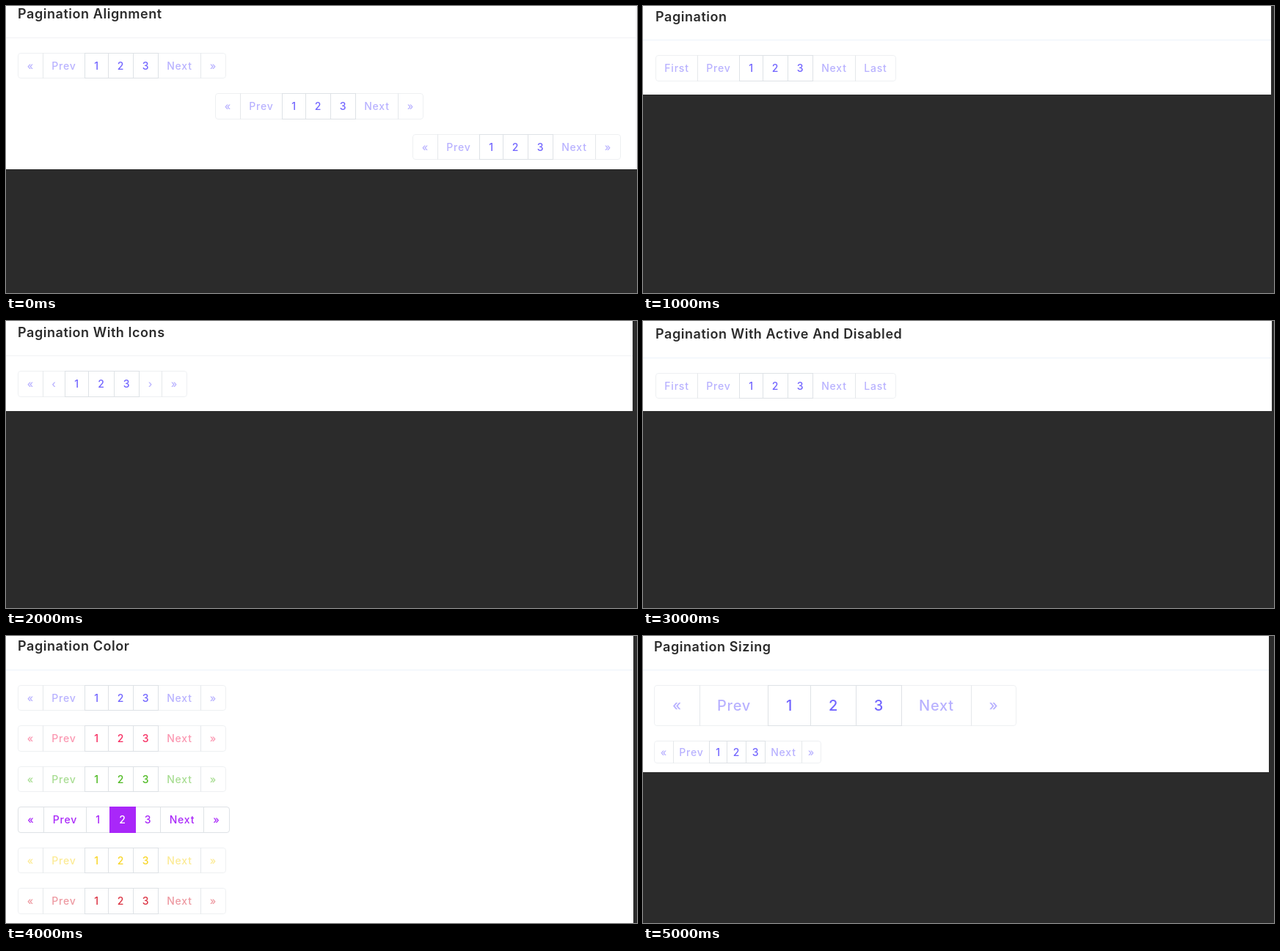
Animation of 860x392 px, one loop 6000 ms. Source, as an HTML page:

```html
<!DOCTYPE html>
<html lang="en">
<head>
<meta charset="utf-8">
<title>Pagination styles</title>
<style>
  html, body { margin: 0; width: 100%; height: 100%; overflow: hidden; background: #2b2b2b; }
  body { font: 450 14px Inter, Roboto, sans-serif; letter-spacing: .8px; }
  .card, .card > *, .cell { position: absolute; box-sizing: border-box; }
  .card { left: 0; top: 0; background: #fff; overflow: hidden; visibility: hidden; animation: show 6s step-end infinite; }
  @keyframes show {
    0% { visibility: visible; }
    16.66667%, 100% { visibility: hidden; }
  }
  .title { font-size: 18px; font-weight: 600; line-height: 20px; letter-spacing: .55px; color: #2b2b2b; white-space: nowrap; }
  .rule { left: 0; width: 100%; height: 1px; }
  .cell { top: 0; height: 100%; border: 1px solid #dee2e6; text-align: center; white-space: nowrap; }
  .cell:first-child { border-radius: 4px 0 0 4px; }
  .cell:last-child { border-radius: 0 4px 4px 0; }
  .off { opacity: .5; }
  .on { z-index: 1; color: #fff; }
</style>
</head>
<body>
<script>
const PRIMARY = '#7366ff';
const ARROWS = ['«', 'Prev', 1, 2, 3, 'Next', '»'];
const WORDS = ['First', 'Prev', 1, 2, 3, 'Next', 'Last'];
const ICONS = ['«', '‹', 1, 2, 3, '›', '»'];

// Left borders of the cells, followed by the last right border.
const EDGES = {
  arrows: [0, 34, 91, 123, 157, 191, 249, 283],
  active: [0, 35, 93, 125, 160, 194, 253, 288],
  words: [0, 57, 114, 146, 180, 214, 272, 327],
  icons: [0, 34, 64, 96, 131, 165, 196, 230],
  large: [0, 62, 155, 213, 275, 337, 432, 493],
  small: [0, 26, 75, 99, 125, 151, 201, 227]
};

const pager = (x, y, height, options = {}) =>
  ({ x, y, height, edges: EDGES.arrows, labels: ARROWS, color: PRIMARY, size: 14, ...options });

const colors = [PRIMARY, '#f73164', '#51bb25', '#a927f9', '#f8d62b', '#dc3545'];
const words = { edges: EDGES.words, labels: WORDS };

const cards = [
  { title: 'Pagination Alignment', x: 16, titleY: 11, ruleY: 43, width: 858, height: 223, rule: '#f1f2f4', edge: '#f4f4f6',
    pagers: [pager(16, 64, 35), pager(285, 119, 36), pager(554, 175, 35)] },
  { title: 'Pagination', x: 17, titleY: 15, ruleY: 46, width: 856, height: 121,
    pagers: [pager(17, 67, 36, words)] },
  { title: 'Pagination With Icons', x: 16, titleY: 16, ruleY: 47, width: 854, height: 123, rule: '#f1f2f4',
    pagers: [pager(16, 68, 36, { edges: EDGES.icons, labels: ICONS })] },
  { title: 'Pagination With Active And Disabled', x: 17, titleY: 18, ruleY: 50, width: 857, height: 123,
    pagers: [pager(17, 71, 35, words)] },
  { title: 'Pagination Color', x: 16, titleY: 14, ruleY: 46, width: 855, height: 392,
    pagers: colors.map((color, i) => pager(16, Math.floor(67 + i * 55.5), 35 + i % 2,
      i === 3 ? { color, edges: EDGES.active, active: 2 } : { color })) },
  { title: 'Pagination Sizing', x: 15, titleY: 15, ruleY: 46, width: 853, height: 186,
    pagers: [pager(15, 67, 56, { edges: EDGES.large, size: 20 }), pager(15, 143, 31, { edges: EDGES.small })] }
];

function add(parent, className, style, text = '') {
  const node = document.createElement('div');
  node.className = className;
  node.textContent = text;
  Object.assign(node.style, style);
  return parent.appendChild(node);
}

const px = value => value + 'px';

function addPager(card, { x, y, height, edges, labels, color, size, active }) {
  const list = add(card, 'pager', {
    left: px(x), top: px(y), height: px(height), width: px(edges[7] + 1),
    color, fontSize: px(size), lineHeight: px(height - 2), fontWeight: active ? 500 : 450
  });
  labels.forEach((label, i) => {
    const on = label === active;
    const off = !active && typeof label === 'string';
    const style = { left: px(edges[i]), width: px(edges[i + 1] - edges[i] + 1) };
    if (on) style.background = style.borderColor = color;
    add(list, 'cell' + (on ? ' on' : off ? ' off' : ''), style, label);
  });
}

cards.forEach((data, i) => {
  const card = add(document.body, 'card', {
    width: px(data.width), height: px(data.height), animationDelay: `${i ? i - cards.length : 0}s`
  });
  if (data.edge) {
    card.style.boxSizing = 'content-box';
    card.style.borderRight = `2px solid ${data.edge}`;
  }
  add(card, 'title', { left: px(data.x), top: px(data.titleY - 10) }, data.title);
  add(card, 'rule', { top: px(data.ruleY), background: data.rule || '#ecf3fa' });
  data.pagers.forEach(item => addPager(card, item));
});
</script>
</body>
</html>
```
